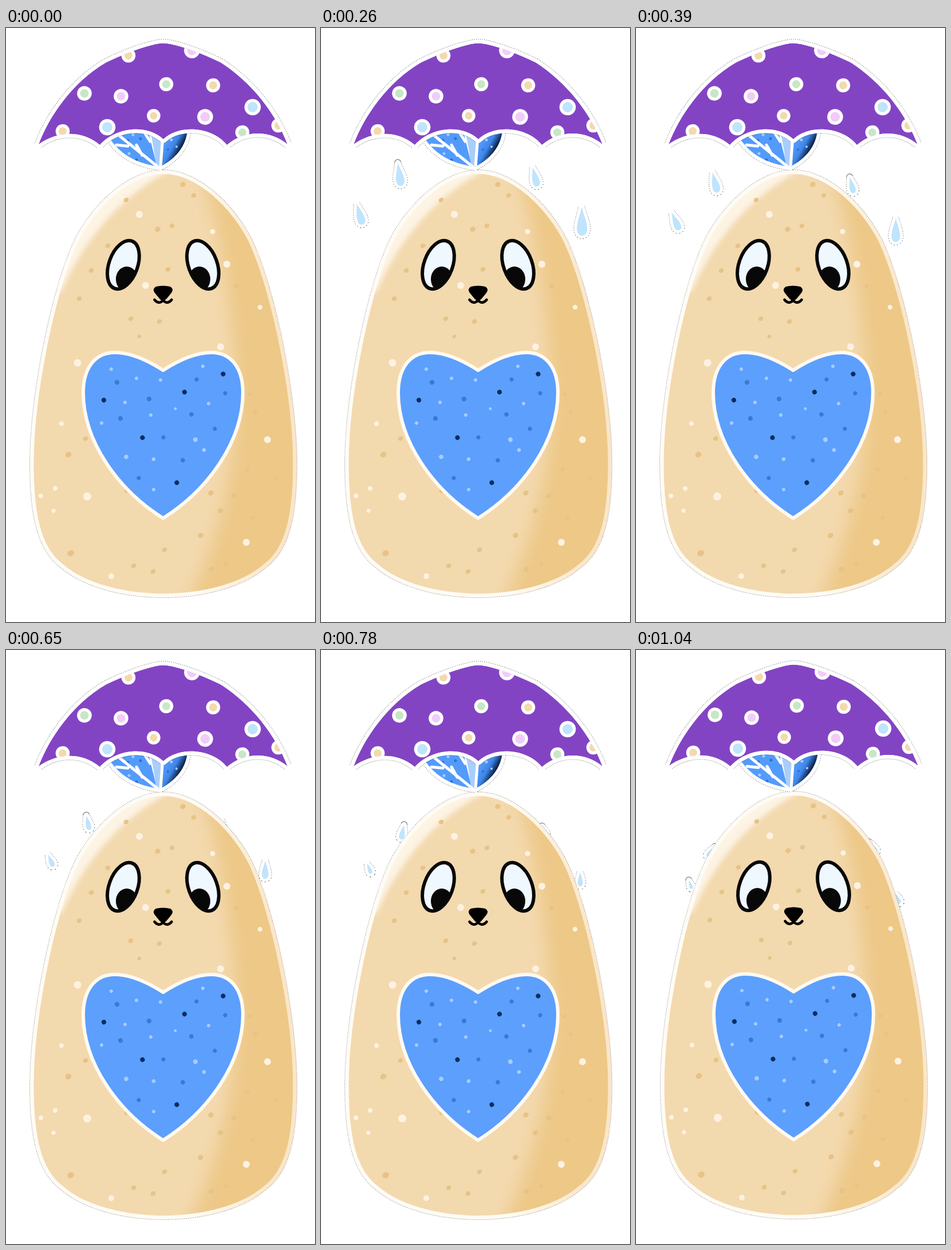
Recreate the animation shown at these times as an HTML page. Size 540 by 1036 pixels, loop 1.17 s.

```html
<!DOCTYPE html>
<html lang="en">
<head>
<meta charset="utf-8">
<title>Rainy day</title>
<style>
  html, body { margin: 0; width: 100%; height: 100%; overflow: hidden; background: #fff; }
  svg { display: block; width: 540px; height: 1036px; }
  .fringe { fill: none; stroke: #333; stroke-opacity: .75; stroke-dasharray: 1 2.2; }
  .rim { fill: #fff; stroke: #fff; stroke-linejoin: round; }
</style>
</head>
<body>
<svg viewBox="0 0 540 1036">
  <defs>
    <path id="bodyShape" d="M275 248C340 248 403 315 430 370C470 455 508 640 508 760C508 850 495 910 455 940C415 975 345 993 275 993C205 993 135 975 95 940C55 910 42 850 42 760C42 640 80 455 120 370C147 315 210 248 275 248Z"/>
    <path id="canopy" d="M57 203C75 155 115 95 175 60Q225 36 262 28Q274 25 288 28Q325 36 375 60C430 95 472 150 492 203C465 180 420 175 386 204C363 174 305 166 275 194C245 166 190 174 164 204C130 175 85 182 57 203Z"/>
    <path id="leaves" d="M178 187C194 215 222 236 269 242C297 228 315 205 317 178L275 160Z"/>
    <ellipse id="eyeShape" cx="205" cy="413" rx="25" ry="44" transform="rotate(20 205 413)"/>
    <clipPath id="inBody"><use href="#bodyShape"/></clipPath>
    <clipPath id="inCanopy"><use href="#canopy"/></clipPath>
    <clipPath id="inLeaves"><use href="#leaves"/></clipPath>
    <clipPath id="inEye"><use href="#eyeShape"/></clipPath>
    <filter id="soft" x="-50%" y="-50%" width="200%" height="200%"><feGaussianBlur stdDeviation="14"/></filter>
    <filter id="softer" x="-50%" y="-50%" width="200%" height="200%"><feGaussianBlur stdDeviation="5"/></filter>
    <linearGradient id="rimTint" gradientUnits="userSpaceOnUse" x1="330" x2="470">
      <stop stop-color="#fffbf5"/><stop offset="1" stop-color="#fae6c8"/>
    </linearGradient>
    <linearGradient id="leafTint" gradientUnits="userSpaceOnUse" x1="284" y1="196" x2="311" y2="211">
      <stop stop-color="#4f97f8"/><stop offset=".4" stop-color="#3f86e8"/><stop offset=".85" stop-color="#07173c"/>
    </linearGradient>
  </defs>

  <g id="drops"></g>

  <g id="figure">
    <use href="#bodyShape" class="fringe" stroke-width="2"/>
    <g clip-path="url(#inBody)">
      <use href="#bodyShape" fill="#f3d9ae"/>
      <path d="M340 250C385 380 393 500 402 600C410 750 370 900 315 1010H580V200Z" fill="#edc887" filter="url(#soft)"/>
      <path d="M290 246Q160 314 96 462L50 420L150 230Z" fill="#fffaf2" opacity=".8" filter="url(#softer)"/>
      <g id="speckles"></g>
      <use href="#bodyShape" fill="none" stroke="url(#rimTint)" stroke-width="13"/>
    </g>

    <path d="M274.5 597C245 578 215 566 190 566C155 566 135 594 135 636C135 720 195 805 274.5 855C354 805 414 720 414 636C414 594 394 566 359 566C334 566 304 578 274.5 597Z" fill="#5c9ffd" stroke="#fff9f0" stroke-width="6" stroke-linejoin="round"/>
    <g id="heartDots"></g>

    <g id="eye">
      <use href="#eyeShape" fill="#f0f8ff"/>
      <ellipse cx="211" cy="438" rx="19" ry="22" fill="#080808" clip-path="url(#inEye)"/>
      <use href="#eyeShape" fill="none" stroke="#080808" stroke-width="6"/>
    </g>
    <use href="#eye" transform="matrix(-1 0 0 1 549 0)"/>
    <path d="M262 451Q274 448 287 451Q294 455 289 462L280 473Q274 478 269 473L260 462Q255 455 262 451Z"/>
    <path d="M259.5 474Q267 483 274.5 475Q282 483 289.5 474" fill="none" stroke="#000" stroke-width="4.5" stroke-linecap="round"/>

    <use href="#leaves" class="fringe" stroke-width="14"/>
    <use href="#leaves" class="rim" stroke-width="12"/>
    <g clip-path="url(#inLeaves)">
      <path d="M170 170H246Q256 210 266 250H170Z" fill="#539bfb"/>
      <path d="M250 170H278L268 242L262 238Q258 205 250 170Z" fill="#a9cefc"/>
      <path d="M275 170H325V250H268Z" fill="url(#leafTint)"/>
      <g id="leafDots"></g>
      <path d="M192 183L264 241M193 204L213 206M228 204L238 222M274 190Q272 215 270 244M238 176L252 198" fill="none" stroke="#fff" stroke-width="5" stroke-linecap="round"/>
    </g>

    <use href="#canopy" class="fringe" stroke-width="15"/>
    <use href="#canopy" class="rim" stroke-width="13"/>
    <g clip-path="url(#inCanopy)">
      <use href="#canopy" fill="#8344c4"/>
      <g id="canopyDots"></g>
    </g>
  </g>
</svg>
<script>
const byId = id => document.getElementById(id);

// Adds one spot for every x, y, radius triple.
function spots(id, color, list, flat = 1) {
  let out = '';
  for (let i = 0; i < list.length; i += 3) {
    const [x, y, r] = list.slice(i, i + 3);
    out += `<ellipse cx="${x}" cy="${y}" rx="${r}" ry="${r * flat}" fill="${color}" transform="rotate(-30 ${x} ${y})"/>`;
  }
  byId(id).innerHTML += out;
}

spots('speckles', '#e7c387', [
  210,300,4.5, 309,273,5, 328,292,4.5, 265,351,5, 290,345,4.5, 178,380,4.5, 149,423,4.5,
  128,472,4.5, 283,421,4.5, 218,507,4.5, 268,512,4.5, 233,538,3.5, 139,716,4.5, 109,744,5.5,
  113,916,6, 223,938,4.5, 257,948,4.5, 277,910,4.5, 340,885,5, 358,811,5, 375,842,5,
  211,807,4.5, 403,450,4, 426,639,4, 436,670,4, 422,770,4, 471,785,3.5, 398,816,5,
  431,854,4, 385,935,4, 359,944,5], .85);
spots('speckles', '#fdf2e2', [
  233,325,6, 361,355,4.5, 386,412,6, 244,449,6, 444,487,4, 375,556,6, 125,584,6.5, 97,690,4,
  457,718,6, 86,803,4, 61,816,4, 83,842,3.5, 142,817,7, 420,897,6, 184,956,5]);

spots('heartDots', '#0b2d5e', [171,649,4, 312,635,4, 379.5,603.5,4, 238.5,714.5,4, 298.5,793,4]);
spots('heartDots', '#3a79cd', [
  194,618,4, 333,613,3.5, 383,637,3.5, 250,647,4, 200,681,4, 324,674,3.7, 275,714,3.5,
  309,754,3.7, 365,699,3.5, 232,785,3.5]);
spots('heartDots', '#a6ccfe', [
  184,595,3, 228,611,3, 270,614,3, 344,590,3, 208,653,3, 354,655,3, 296,664,2.5, 253,675,3,
  167,689,3, 331,718,4, 346,736,3.3, 210,748,3.8, 258,752,3.3, 258,805,3]);

spots('leafDots', '#2f6fd0', [213,196,2.5, 228,230,2.5, 235,193,2.5, 283,212,2]);
spots('leafDots', '#a6ccfe', [215,219,2.5, 222,186,2.5, 289,195,2.5, 298,207,2]);

const polka = {
  '#f3d9ae': [214,48,7, 362,100,7, 258,153,6.5, 99,180,7, 476,170,7],
  '#c8e6c8': [137,114,7.5, 280,98,7, 413,182,7],
  '#f2cbfb': [325,39,8.5, 201,119,7.5, 348,155,8.5],
  '#bfe4fd': [431,138,9, 177,173,9]
};
for (const [color, list] of Object.entries(polka)) {
  spots('canopyDots', '#fff', list.map((v, i) => i % 3 == 2 ? v + 5.3 : v));
  spots('canopyDots', color, list);
}

// Drop poses at these steps: x, y, height, tilt.
const STEP = 130, COUNT = 9, keys = [1, 3, 5, 7, 8];
const falls = [
  [[136,241,44,-2], [138,269,37,-14], [143,301,26,-12], [142,334,26,35], [131,352,22,35]],
  [[371,245,41,-14], [377,274,29,-14], [377,302,12,-10], [403,330,26,-35], [414,344,22,-35]],
  [[66,312,42,-8], [69,337,34,-24], [78,367,24,-24], [90,395,15,-20], [95,409,16,-20]],
  [[458,322,58,-2], [454,352,42,0], [453,383,32,0], [453,416,18,0], [457,433,20,-25]]
];

function pose(fall, step) {
  const i = Math.min(keys.filter(k => k <= step).length - 1, keys.length - 2);
  const t = (step - keys[i]) / (keys[i + 1] - keys[i]);
  return fall[i].map((v, j) => v + (fall[i + 1][j] - v) * t);
}

function drop([x, y, h, tilt]) {
  const p = (a, b) => `${a * h} ${b * h} `;
  const d = 'M' + p(0, -.5) + 'C' + p(.05, -.25) + p(.18, 0) + p(.18, .26) +
    'C' + p(.18, .42) + p(.1, .5) + p(0, .5) + 'C' + p(-.1, .5) + p(-.18, .42) + p(-.18, .26) +
    'C' + p(-.18, 0) + p(-.05, -.25) + p(0, -.5) + 'Z';
  return `<g transform="translate(${x} ${y}) rotate(${tilt})">
    <path d="${d}" class="fringe" stroke-width="12" stroke-linejoin="round"/>
    <path d="${d}" class="rim" stroke-width="10"/><path d="${d}" fill="#bfe4fd"/></g>`;
}

let shown = -1;
function draw(now) {
  const step = Math.floor(now / STEP) % COUNT;
  if (step !== shown) {
    shown = step;
    byId('drops').innerHTML = step ? falls.map(f => drop(pose(f, step))).join('') : '';
    byId('figure').setAttribute('transform', step === COUNT - 1 ? 'translate(1 -1)' : '');
  }
  requestAnimationFrame(() => draw(performance.now() - start));
}
const start = performance.now();
draw(0);
</script>
</body>
</html>
```
